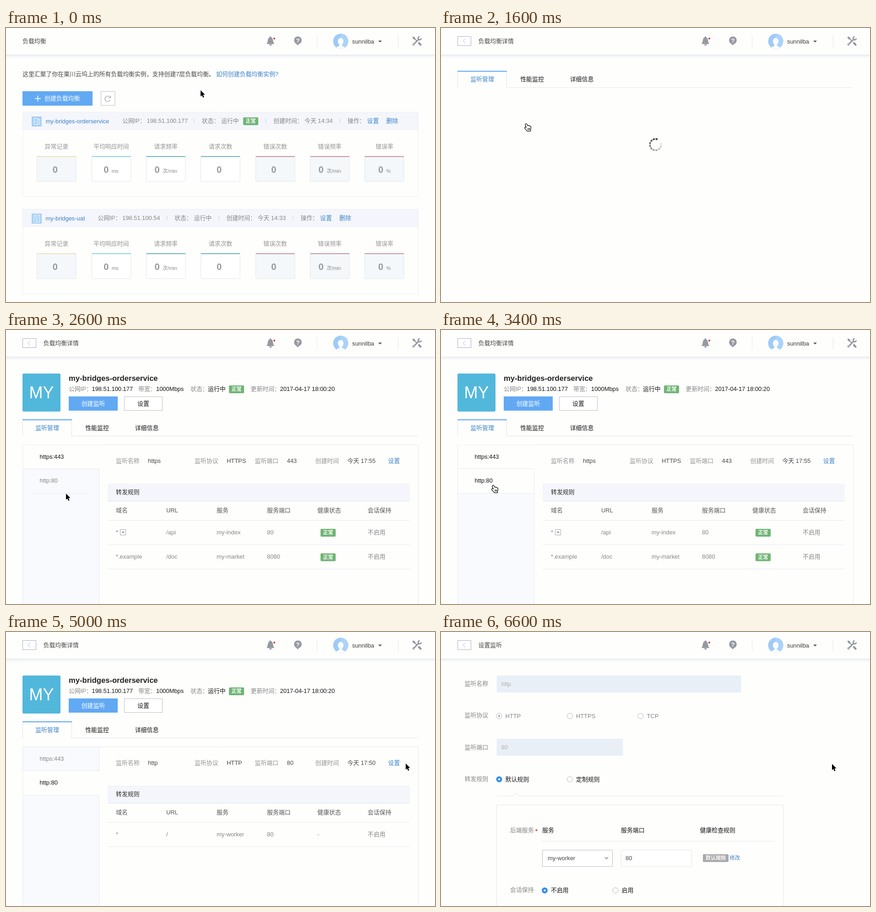
Recreate the animation shown at these times as an HTML page with a canvas. Size 937 by 598 pixels, loop 6.8 s.

```html
<!DOCTYPE html>
<html lang="zh-CN">
<head>
<meta charset="utf-8">
<title>负载均衡</title>
<style>
html, body { margin: 0; width: 100%; height: 100%; overflow: hidden; background: #fefefd; }
canvas { display: block; width: 937px; height: 598px; }
</style>
</head>
<body>
<canvas id="stage" width="937" height="598"></canvas>
<script>
const ctx = document.getElementById('stage').getContext('2d');
const W = 937, H = 598, LOOP = 6800, STEP = 200;
const FONT = '"Liberation Sans", Arial, "Noto Sans CJK SC", "Noto Sans CJK", sans-serif';
const PAGE = '#fefefd', BLUE = '#3a82c8', BUTTON = '#62a9f3', GREEN = '#70b475', INK = '#141414',
  MID = '#585858', GRAY = '#868686', PALE = '#949494', LINE = '#e7eaef', TINT = '#f4f6fb';
const SERVICE = 'my-bridges-orderservice', IP = '198.51.100.177';

// Drawing helpers: text y is the middle of its row
function text(str, x, y, color = INK, size = 12.9, align = 'left', weight = 'normal') {
  ctx.font = `${weight} ${size}px ${FONT}`;
  ctx.textAlign = align;
  ctx.fillStyle = color;
  ctx.fillText(str, x, Math.round(y + size * 0.33));
}

function box(x, y, w, h, fill, stroke, radius = 0) {
  ctx.beginPath();
  ctx.roundRect(x, y, w, h, radius);
  if (fill) { ctx.fillStyle = fill; ctx.fill(); }
  if (stroke) { ctx.strokeStyle = stroke; ctx.lineWidth = 1; ctx.stroke(); }
}

function path(points, { fill, stroke, width = 1, close = false }) {
  ctx.beginPath();
  points.forEach(([x, y]) => ctx.lineTo(x, y));
  if (close) ctx.closePath();
  if (stroke) { ctx.strokeStyle = stroke; ctx.lineWidth = width; ctx.stroke(); }
  if (fill) { ctx.fillStyle = fill; ctx.fill(); }
}

const line = (x1, y1, x2, y2, stroke = LINE, width = 1) => path([[x1, y1], [x2, y2]], { stroke, width });

function disc(x, y, r, fill, stroke, width = 1) {
  ctx.beginPath();
  ctx.arc(x, y, r, 0, 7);
  if (fill) { ctx.fillStyle = fill; ctx.fill(); }
  if (stroke) { ctx.strokeStyle = stroke; ctx.lineWidth = width; ctx.stroke(); }
}

function badge(x, y) {
  box(x, y, 33, 17, GREEN, null, 2);
  text('正常', x + 16.5, y + 8.5, '#fff', 11, 'center', 'bold');
}

function radio(x, y, label, state, color = INK) {
  if (state === 'on') {
    disc(x, y, 6.5, '#318eec');
    disc(x, y, 2.2, '#fff');
  } else {
    disc(x, y, 6, '#fff', '#b5b5b5');
    if (state === 'locked') disc(x, y, 2.2, '#a5a5a5');
  }
  text(label, x + 13.5, y, color);
}

function tools() {
  const c = '#90959d';
  ctx.save();
  ctx.translate(897.5, 28.5);
  path([[-10, -8], [-8, -10], [-4, -7.5], [-3.5, -5], [0, -1.5], [-1.5, 0], [-5, -3.5], [-7.5, -4]],
    { fill: c, close: true });
  ctx.lineCap = 'round';
  line(4.5, 4.5, 8, 8, c, 4.2);
  line(-7.5, 7.5, 3.5, -3.5, c, 3);
  ctx.lineCap = 'butt';
  ctx.strokeStyle = c;
  ctx.lineWidth = 2.6;
  ctx.beginPath();
  ctx.arc(6, -6, 3.4, 0, Math.PI * 1.5);
  ctx.stroke();
  disc(-7.5, 7.5, 2.4, c);
  disc(-7.5, 7.5, 0.9, PAGE);
  ctx.restore();
}

function avatar() {
  ctx.save();
  disc(731, 29, 16.5, '#9fcbf7');
  ctx.clip();
  box(731, 12, 18, 34, '#abd2f9');
  ctx.fillStyle = '#fbfdff';
  ctx.beginPath();
  ctx.ellipse(731, 29, 6.2, 7.5, 0, 0, 7);
  ctx.fill();
  box(728, 34, 6, 6, '#fbfdff');
  ctx.beginPath();
  ctx.ellipse(731, 46, 10.5, 7, 0, 0, 7);
  ctx.fill();
  ctx.restore();
}

function header(title, back) {
  ctx.save();
  ctx.shadowColor = 'rgba(90,110,160,.2)';
  ctx.shadowBlur = 7;
  ctx.shadowOffsetY = 2;
  box(-10, -10, W + 20, 68, PAGE);
  ctx.restore();
  if (back) {
    box(36.5, 18.5, 29, 20, '#fff', '#a9b0c6');
    path([[53, 23.5], [48, 28.5], [53, 33.5]], { stroke: '#a9b0c6' });
  }
  text(title, back ? 81.5 : 36, 28.5, '#444');

  const icon = '#9599a1';
  ctx.fillStyle = icon;
  ctx.beginPath();
  ctx.moveTo(569, 35);
  ctx.bezierCurveTo(573, 32, 570, 20, 577.5, 20);
  ctx.bezierCurveTo(585, 20, 582, 32, 586.5, 35);
  ctx.fill();
  disc(577.5, 20, 1.8, icon);
  box(575, 35.5, 5.5, 2.8, icon, null, 1.4);
  disc(586, 23, 2, '#d9303e');

  disc(637.5, 26.8, 8.4, icon);
  path([[632, 32], [637, 38], [642, 33]], { fill: icon });
  text('?', 637.5, 27.3, '#fff', 13, 'center', 'bold');

  line(679.5, 16, 679.5, 42, '#e4e6ea');
  line(856.5, 16, 856.5, 42, '#e4e6ea');
  avatar();
  text('sunnilba', 756, 29.5, '#3c3c3c');
  path([[813, 27.5], [821, 27.5], [817, 31.5]], { fill: '#555' });
  tools();
}

// List page
const STATS = [
  ['异常记录', '', '#ecd9a4', -3],
  ['平均响应时间', 'ms', '#5fc9d3', -11],
  ['请求频率', '次/min', '#409aae', -19],
  ['请求次数', '', '#409aae', -3],
  ['错误次数', '', '#b8757f', -3],
  ['错误频率', '次/min', '#b8757f', -19],
  ['错误率', '%', '#b8757f', -8]
];

function stat([label, unit, color, shift], i, y) {
  const cx = 110.4 + i * 119.35, left = Math.round(cx - 43) + 0.5;
  const filled = i === 0 || i > 3;
  text(label, cx, y + 75.5, PALE, 12.9, 'center');
  box(left, y + 97.5, 85.5, 54.5, filled ? '#f4f8fb' : '#fff', '#e1e6ea', 2);
  line(left, y + 97.5, left + 85.5, y + 97.5, color, 1.4);
  text('0', cx + shift, y + 126, '#999', 20, 'center', 'bold');
  text(unit, cx + shift + 12, y + 129, GRAY, 11);
}

function card(y, name, ip, clock, x, running) {
  const mid = y + 20;
  box(36.5, y + 0.5, 864, 184, PAGE, '#eceff3');
  box(37, y + 1, 863, 38, TINT);
  line(37, y + 38.5, 900, y + 38.5, '#e9edf3');

  box(56, y + 10, 22, 22, '#a9d1f5');
  if (running) {
    box(61.5, y + 14.5, 8, 13, null, '#fff');
    path([[69.5, y + 16.5], [73.5, y + 16.5], [73.5, y + 26.5], [69.5, y + 26.5]], { stroke: '#fff' });
    line(65.5, y + 19, 65.5, y + 23, '#fff');
  } else {
    box(60.5, y + 13.5, 13, 15, null, '#fff');
    [17.5, 21.5].forEach(dy => line(63, y + dy, 71, y + dy, '#fff'));
    line(65.5, y + 25, 68.5, y + 25, '#fff', 2);
  }
  text(name, 86.5, y + 20.5, BLUE);

  const gap = running ? 6 : 0;
  text('公网IP：', x, mid, GRAY);
  text(ip, x + 53.5, mid, GRAY);
  text('状态：', x + 167.5 + gap, mid, GRAY);
  text('运行中', x + 210 + gap, mid, GRAY);
  if (running) badge(518, y + 12);
  const rest = running ? 584 : 481.5;
  text('创建时间：', rest, mid, GRAY);
  text('今天 ' + clock, rest + 68, mid, GRAY);
  text('操作：', rest + 162, mid, GRAY);
  text('设置', rest + 204.5, mid, BLUE);
  text('删除', rest + 246.5, mid, BLUE);
  const firstBar = running ? 410.5 : 351.5;
  [firstBar, rest - 16.5, rest + 145.5].forEach(bx => line(bx, y + 15, bx, y + 24, '#c8ccd2'));
  STATS.forEach((s, i) => stat(s, i, y));
}

function listPage() {
  header('负载均衡', false);
  text('这里汇聚了你在栗川云坞上的所有负载均衡实例，支持创建7层负载均衡。', 36, 101, '#484848');
  text('如何创建负载均衡实例?', 459, 101, BLUE);
  box(36, 138, 153, 31.5, BUTTON);
  line(63, 154, 76, 154, '#fff', 1.6);
  line(69.5, 147.5, 69.5, 160.5, '#fff', 1.6);
  text('创建负载均衡', 84, 154, '#fff');
  box(207.5, 138.5, 30.5, 30.5, '#fff', '#bfbfbf');
  ctx.beginPath();
  ctx.arc(222, 154.5, 6, 0.5, 5.7);
  ctx.strokeStyle = '#999';
  ctx.lineWidth = 1.2;
  ctx.stroke();
  path([[228.5, 148], [228.5, 152.5], [224, 152.5]], { stroke: '#999', width: 1.2 });
  card(183, SERVICE, IP, '14:34', 254, true);
  card(395, 'my-bridges-uat', '198.51.100.54', '14:33', 200.5, false);
}

// Detail page
function tabs(y) {
  path([[36.5, y + 36], [36.5, y], [143.5, y], [143.5, y + 35.5], [900, y + 35.5]], { stroke: '#e1e5ea' });
  box(36, y - 1, 108, 2, '#5aa5f2');
  text('监听管理', 90, y + 17.5, BLUE, 12.9, 'center');
  text('性能监控', 199, y + 17.5, INK, 12.9, 'center');
  text('详细信息', 307.5, y + 17.5, INK, 12.9, 'center');
}

function waitingPage(t) {
  header('负载均衡详情', true);
  tabs(94.5);
  const head = -1.2 + (t - 1600) / 1000 * Math.PI * 2;
  for (let i = 0; i < 11; i++) {
    const a = head - i * 0.5, shade = Math.round(50 + i * 17);
    ctx.beginPath();
    ctx.arc(468.5, 254.5, 12.3, a - 0.36, a);
    ctx.strokeStyle = `rgb(${shade},${shade},${shade})`;
    ctx.lineWidth = 3.4;
    ctx.stroke();
  }
}

function sideItem(y, label, selected, hovered) {
  const lit = selected || hovered;
  if (lit) box(37, y, selected ? 168 : 166, 53, PAGE);
  text(label, 73.5, y + 26, lit ? INK : GRAY);
}

function sidebar(http, hover) {
  box(37, 251, 166, 350, '#f8fafd');
  line(203.5, 251, 203.5, H, LINE);
  sideItem(250.5, 'https:443', !http, false);
  sideItem(303, 'http:80', http, hover);
  line(37, 302.5, 203, 302.5, LINE);
  const inset = http || hover ? 0 : 18;
  line(37 + inset, 356.5, 203 - inset, 356.5, LINE);
}

function detailPage(http, hover) {
  header('负载均衡详情', true);
  box(36, 95, 83, 83, '#52b8db', null, 3);
  text('MY', 77.5, 137, '#fff', 36, 'center');
  text(SERVICE, 137, 105.5, '#222', 16.6, 'left', 'bold');
  [['公网IP：', 137, IP, 187.5], ['带宽：', 289, '1000Mbps', 328], ['状态：', 403, '运行中', 441],
    ['更新时间：', 534.5, '2017-04-17 18:00:20', 598.5]].forEach(([k, kx, v, vx]) => {
    text(k, kx, 129, GRAY);
    text(v, vx, 129);
  });
  badge(487, 121);
  box(137, 145, 107, 31, BUTTON);
  text('创建监听', 190.5, 160.5, '#fff', 12.9, 'center');
  box(258.5, 145.5, 83, 30, '#fff', '#bdbdbd');
  text('设置', 300, 160.5, INK, 12.9, 'center');
  tabs(196);

  box(36.5, 250.5, 864, 400, null, LINE);
  sidebar(http, hover);
  [['监听名称', 240, http ? 'http' : 'https', 310], ['监听协议', 412, http ? 'HTTP' : 'HTTPS', 482],
    ['监听端口', 543.5, http ? '80' : '443', 613.5], ['创建时间', 675.5, http ? '今天 17:50' : '今天 17:55', 745.5]
  ].forEach(([k, kx, v, vx]) => {
    text(k, kx, 285.5, PALE);
    text(v, vx, 285.5, '#484848');
  });
  text('设置', 834.5, 285.5, BLUE);

  box(222, 335, 660, 38, TINT);
  line(222, 373.5, 882, 373.5, '#dde4eb');
  text('转发规则', 240, 354, '#282828');
  const row = (cells, y, color) => cells.forEach((c, i) => {
    if (c === 'ok') badge(687, y - 7.5);
    else text(c, 240 + i * 110, y, color);
  });
  row(['域名', 'URL', '服务', '服务端口', '健康状态', '会话保持'], 394, MID);
  line(222, 415.5, 882, 415.5);
  line(222, 468.5, 882, 468.5);
  if (http) {
    row(['*', '/', 'my-worker', '80', '-', '不启用'], 441.5, GRAY);
    return;
  }
  row(['*', '/api', 'my-index', '80', 'ok', '不启用'], 441.5, GRAY);
  box(249.5, 435.5, 12, 12, '#fff', '#aaa');
  path([[252.5, 440], [258.5, 440], [255.5, 443.5]], { fill: '#888' });
  row(['*.example', '/doc', 'my-market', '8080', 'ok', '不启用'], 495, GRAY);
  line(222, 521.5, 882, 521.5);
}

// Settings page
function loadingPage() {
  header('设置监听', true);
  text('加载中...', 443.5, 104);
}

function formPage() {
  header('设置监听', true);
  ['监听名称', '监听协议', '监听端口', '转发规则'].forEach((s, i) => text(s, 51.5, 113 + i * 69.2, GRAY));
  box(121.5, 95, 534, 37, '#e8eff7', null, 2);
  text('http', 131.5, 113.5, '#b0b0b0');
  ['HTTP', 'HTTPS', 'TCP'].forEach((s, i) => radio(127 + i * 154.5, 183.5, s, i ? '' : 'locked', GRAY));
  box(121.5, 233, 276, 37, '#e8eff7', null, 2);
  text('80', 131.5, 252, '#b0b0b0');
  radio(127, 321.5, '默认规则', 'on');
  radio(281.5, 321.5, '定制规则', '');
  path([[122, 358], [157, 358], [163.5, 351.5], [170, 358], [747, 358]], { stroke: '#e2e5e9' });

  box(121.5, 377.5, 626, 300, null, '#e2e5e9');
  text('后端服务', 151, 433, GRAY);
  text('*', 206, 435, '#d9303e', 12.9, 'left', 'bold');
  text('服务', 221, 433);
  text('服务端口', 393, 433);
  text('健康检查规则', 565.5, 433);
  line(221, 456.5, 729, 456.5, '#e2e5e9');
  box(221.5, 476, 153, 36, '#fff', '#bcbcbc', 1);
  text('my-worker', 233, 494, '#444');
  path([[358, 491.5], [361.5, 495], [365, 491.5]], { stroke: '#777', width: 1.3 });
  box(393.5, 476, 154, 36, '#fff', '#e2e5e9', 1);
  text('80', 403, 494, '#444');
  box(572, 485, 56, 17, '#a9a9a9', null, 2);
  text('默认规则', 600, 493.5, '#fff', 11, 'center', 'bold');
  text('修改', 630.5, 493.5, BLUE, 11.2);
  text('会话保持', 151, 563, GRAY);
  radio(226.5, 564, '不启用', 'on');
  radio(381, 564, '启用', '');
}

// Pointer: time, tip x, tip y, shape from that time on
const ROUTE = [
  [0, 425, 136, 'arrow'], [1000, 200, 206, 'hand'], [1200, 187, 209, 'hand'], [2000, 187, 209, 'arrow'],
  [2600, 131, 357, 'arrow'], [3000, 122, 346, 'hand'], [3400, 115, 339, 'hand'], [4400, 115, 339, 'arrow'],
  [5000, 873, 287, 'arrow'], [5200, 854, 289, 'hand'], [6600, 854, 288, 'arrow'], [6800, 854, 288, 'arrow']
];

function pointer(t) {
  const i = ROUTE.findIndex((p, n) => t >= p[0] && t < ROUTE[n + 1][0]);
  const [t0, x0, y0, shape] = ROUTE[i], [t1, x1, y1] = ROUTE[i + 1];
  const k = (t - t0) / (t1 - t0), ease = k * k * (3 - 2 * k);
  ctx.save();
  ctx.translate(Math.round(x0 + (x1 - x0) * ease), Math.round(y0 + (y1 - y0) * ease));
  ctx.lineJoin = 'round';
  if (shape === 'arrow') {
    path([[0, 0], [0, 13.5], [3, 10.8], [5.2, 15.8], [7.6, 14.8], [5.4, 9.8], [9.6, 9.6]],
      { fill: '#000', stroke: '#fff', width: 2, close: true });
  } else {
    path([[-2.5, 1.5], [-1.2, 0.5], [0.3, 1.3], [2, 5], [3.6, 4.3], [5, 5.2], [6.4, 4.8], [7.4, 6], [8.6, 6.4],
      [9, 9], [8, 12.5], [8, 15.5], [1.5, 15.5], [-1, 12.5], [-3.8, 9], [-3, 7.6], [0, 9]],
      { fill: '#fff', stroke: '#000', width: 2.4, close: true });
    [2.8, 4.8, 6.6].forEach(x => line(x, 9.5, x, 13.5, '#000', 1));
  }
  ctx.restore();
}

function draw(now) {
  const t = Math.floor((now % LOOP) / STEP) * STEP;
  ctx.fillStyle = PAGE;
  ctx.fillRect(0, 0, W, H);
  if (t < 1400) listPage();
  else if (t < 2000) waitingPage(t);
  else if (t < 5600) detailPage(t >= 4400, t >= 3000 && t < 4400);
  else if (t < 6200) loadingPage();
  else formPage();
  pointer(t);
}

function tick() {
  draw(performance.now());
  requestAnimationFrame(tick);
}
tick();
</script>
</body>
</html>
```
